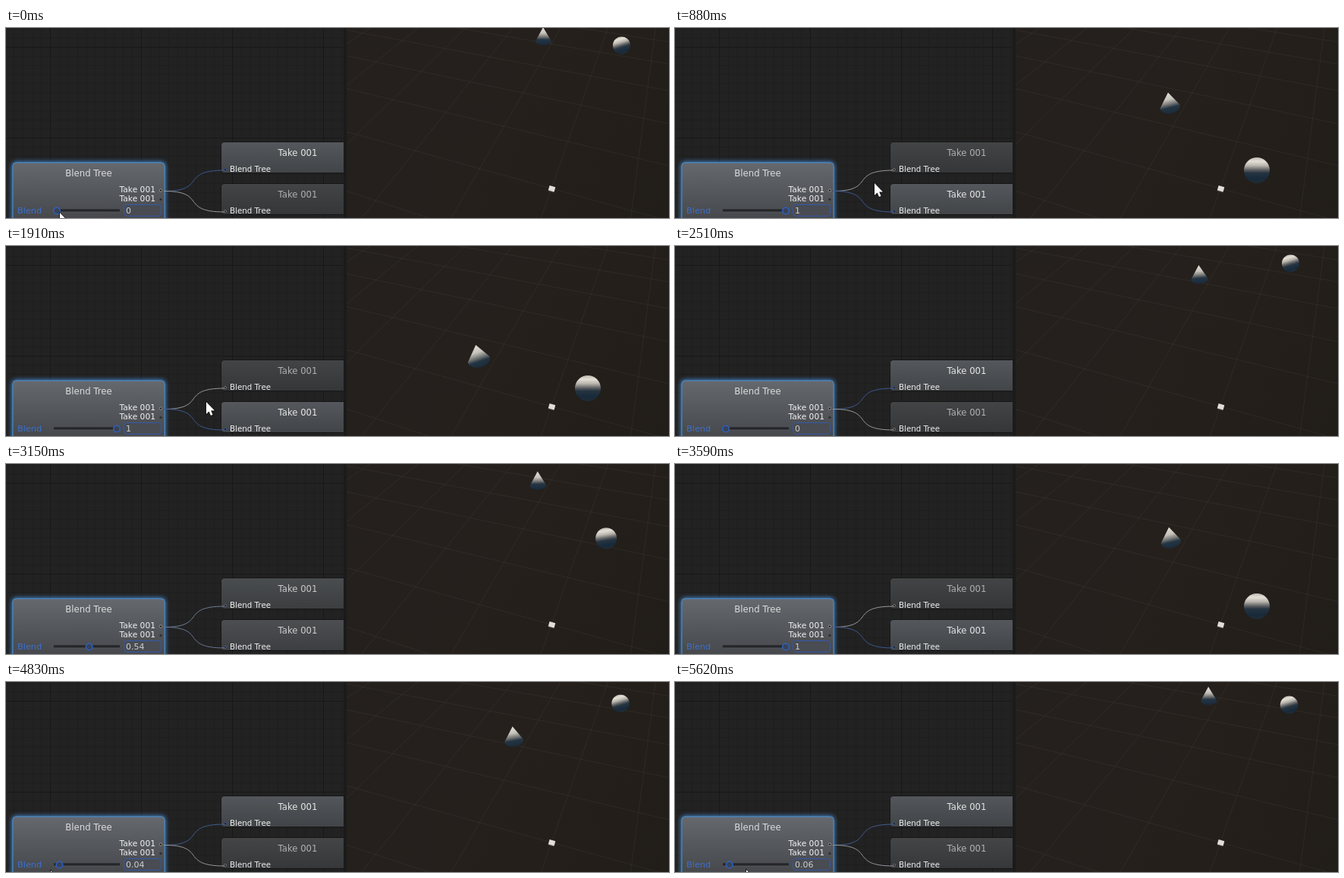
Animation, 874 px wide and 251 px high, one loop 5.66 s. Source, as an HTML page with a canvas:

```html
<!DOCTYPE html>
<html lang="en">
<head>
<meta charset="utf-8">
<title>Blend Tree</title>
<style>
html, body { margin: 0; width: 874px; height: 251px; overflow: hidden; background: #211d1a; }
canvas { display: block; }
</style>
</head>
<body>
<canvas id="stage" width="874" height="251"></canvas>
<script>
const g = document.getElementById('stage').getContext('2d');
const LOOP = 5660, SPLIT = 445, LAG = 370, STEP = 10;
const FONT = '"DejaVu Sans", sans-serif';

// Slider drags: start, end, value reached
const drags = [[110, 770, 1], [1960, 2060, 0], [3050, 3300, 1], [4350, 4900, 0], [5480, 5620, .06]];
// Pointer stops: time, x, y
const stops = [[110, 71, 244], [750, 150, 247], [870, 263, 205], [1960, 264, 206], [2090, 70, 250],
  [2300, 13, 265], [4250, 235, 265], [4350, 200, 250], [4900, 39, 249], [5340, 39, 249], [5620, 94, 248]];

const mix = (a, b, f) => a + (b - a) * f;
const part = (t, a, b) => Math.min(1, Math.max(0, (t - a) / (b - a)));
const rgb = (a, b, f) => `rgb(${a.map((v, i) => Math.round(mix(v, b[i], f))).join()})`;

const blendAt = t => drags.reduce((v, [a, b, to]) => mix(v, to, 1 - (1 - part(t, a, b)) ** 1.5), 0);

// The cone trails the slider exponentially
function trailAt(t) {
  let v = 0;
  for (let s = 0; s < t; s += STEP) v += (blendAt(s) - v) * (1 - Math.exp(-Math.min(STEP, t - s) / LAG));
  return v;
}

function pointerAt(t) {
  let [last, x, y] = stops[0];
  for (const [at, nx, ny] of stops.slice(1)) {
    const f = part(t, last, at);
    x = mix(x, nx, f);
    y = mix(y, ny, f);
    last = at;
  }
  return [x, y];
}

// World distance to distance on the screen
const foreshorten = u => u / (u + 1.4 * (1 - u));

function text(s, x, y, size, color, align = 'left') {
  g.font = `${size}px ${FONT}`;
  g.textAlign = align;
  g.fillStyle = color;
  g.fillText(s, x, y);
}

function line(x0, y0, x1, y1, color) {
  g.strokeStyle = color;
  g.lineWidth = 1;
  g.beginPath();
  g.moveTo(x0, y0);
  g.lineTo(x1, y1);
  g.stroke();
}

function disc(x, y, r, fill, stroke, width = 1) {
  g.beginPath();
  g.arc(x, y, r, 0, 7);
  g.fillStyle = fill;
  g.fill();
  if (!stroke) return;
  g.strokeStyle = stroke;
  g.lineWidth = width;
  g.stroke();
}

function ramp(x0, y0, x1, y1, ...marks) {
  const r = g.createLinearGradient(x0, y0, x1, y1);
  marks.forEach(([at, color]) => r.addColorStop(at, color));
  return r;
}

function box(x, y, w, h, fill, edge) {
  g.beginPath();
  g.roundRect(x, y, w, h, 4);
  g.fillStyle = fill;
  g.fill();
  g.strokeStyle = edge;
  g.lineWidth = 1;
  g.stroke();
}

function graphGrid() {
  g.fillStyle = '#222';
  g.fillRect(0, 0, SPLIT, 251);
  for (let i = -4; i < 33; i++) {
    const color = i % 10 ? '#1e1e1e' : '#181818';
    const x = 58.5 + i * 12, y = 25.5 + i * 12;
    line(x, 0, x, 251, color);
    line(0, y, SPLIT, y, color);
  }
}

function link(y, weight) {
  g.strokeStyle = rgb([155, 155, 155], [62, 90, 148], weight);
  g.lineWidth = 1;
  g.beginPath();
  g.moveTo(208, 215.5);
  g.bezierCurveTo(266, 215.5, 228, y, 288, y);
  g.stroke();
}

function takeNode(y, weight) {
  const fill = ramp(0, y, 0, y + 41,
    [0, rgb([66, 68, 70], [84, 87, 91], weight)], [1, rgb([53, 54, 56], [66, 69, 72], weight)]);
  box(283.5, y - .5, 180, 41, fill, '#161616');
  text('Take 001', 384.5, y + 18, 11.7, rgb([175, 175, 175], [230, 230, 230], weight), 'center');
  text('Blend Tree', 295, y + 39, 10.3, '#eee');
  disc(289, y + 36, 1.5, '#111', rgb([120, 120, 120], [60, 85, 140], weight));
}

function treeNode(blend) {
  const fill = ramp(0, 178, 0, 262, [0, '#65696e'], [.35, '#585b60'], [1, '#424448']);
  g.save();
  g.shadowColor = '#4c9df0';
  g.shadowBlur = 6;
  box(9, 178, 200, 90, fill, '#4683bd');
  g.restore();
  box(9, 178, 200, 90, fill, '#4c88c0');
  text('Blend Tree', 109, 196, 11.7, '#dcdcdc', 'center');
  for (const y of [217, 229]) text('Take 001', 197, y, 10.7, '#f2f2f2', 'right');
  disc(204, 214.5, 1.7, '#111', '#999');
  disc(204, 226.5, 1.5, '#222', '#444');

  text('Blend', 15, 245, 11.3, '#3c70cd');
  g.fillStyle = ramp(0, 239, 0, 244, [0, '#191a1c'], [.6, '#292b2e'], [1, '#606368']);
  g.fillRect(63, 239.5, 87, 4);
  disc(67 + 79 * blend, 241.5, 4.3, '#3a4254', '#2f60bd', 1.6);

  box(155.5, 233.5, 49, 15, '#494c52', '#3358ac');
  text(String(+blend.toFixed(2)), 158, 245, 11, '#cfcfcf');
}

// Ground lines through two vanishing points, counted from the cube
function ground() {
  g.fillStyle = ramp(449, 0, 874, 251, [0, '#24201d'], [.5, '#25201c'], [1, '#211d19']);
  g.fillRect(449, 0, 425, 251);
  const home = [719, 212], far = [893, -283], side = [-1065, -283];
  const point = (i, j) => {
    const a = i * .143, b = j * .056;
    return home.map((v, n) => (v + a * far[n] + b * side[n]) / (1 + a + b));
  };
  const color = 'rgba(230,235,220,.05)';
  for (let i = -2; i < 12; i++) line(...point(i, -7), ...point(i, 16), color);
  for (let j = -7; j < 16; j++) line(...point(-2, j), ...point(14, j), color);
}

function cube() {
  g.save();
  g.translate(719.5, 212.5);
  g.rotate(.28);
  g.fillStyle = '#4c4a48';
  g.fillRect(-4, -3, 8, 7);
  g.fillStyle = '#e2ded6';
  g.fillRect(-4, -3.5, 8, 6.5);
  g.restore();
}

function cone(u) {
  const s = foreshorten(u), x = 708 - 91 * s, y = 135 * s - 1;
  const cx = x + .5 + 3.5 * s, cy = y + 18.5 + .5 * s;
  const rx = 10.5 + 4.5 * s, ry = 5 + 6 * s, turn = -.28 * s;
  const dx = rx * Math.cos(turn), dy = rx * Math.sin(turn);
  g.fillStyle = ramp(x - 2 * s, y, x + 9 * s, y + 24 + 8 * s,
    [0, '#e6e2d8'], [.32, '#c6c3bb'], [.52, '#777877'], [.68, '#243442'], [1, '#172a3b']);
  g.beginPath();
  g.moveTo(x, y);
  g.lineTo(cx + dx, cy + dy);
  g.ellipse(cx, cy, rx, ry, turn, 0, Math.PI);
  g.closePath();
  g.fill();
}

function sphere(u) {
  const s = foreshorten(u);
  const x = 811.5 - 44.5 * s, y = 23 + 165 * s, r = 11.5 + 5.5 * s, tilt = r * .3 * (1 - s);
  disc(x, y, r, ramp(x - tilt, y - r, x + tilt, y + r,
    [0, '#bdb9b1'], [.15, '#e4e0d6'], [.32, '#b9b5ae'], [.48, '#606264'], [.6, '#263440'], [.82, '#172a3b'], [1, '#222c34']));
}

function pointer(x, y) {
  g.beginPath();
  [[0, 0], [0, 16], [3.6, 12.6], [6, 18], [8.6, 16.9], [6.2, 11.6], [11, 11.4]].forEach(([dx, dy]) => g.lineTo(x + dx, y + dy));
  g.closePath();
  g.strokeStyle = '#111';
  g.lineWidth = 1.5;
  g.stroke();
  g.fillStyle = '#fff';
  g.fill();
}

function draw(t) {
  const blend = blendAt(t);
  ground();
  cone(trailAt(t));
  sphere(blend);
  cube();

  g.save();
  g.beginPath();
  g.rect(0, 0, SPLIT, 251);
  g.clip();
  graphGrid();
  takeNode(151, 1 - blend);
  takeNode(206, blend);
  treeNode(blend);
  link(188, 1 - blend);
  link(243, blend);
  g.restore();
  g.fillStyle = '#1b1b1b';
  g.fillRect(SPLIT, 0, 4, 251);
  pointer(...pointerAt(t));
}

function tick() {
  draw(performance.now() % LOOP);
  requestAnimationFrame(tick);
}
tick();
</script>
</body>
</html>
```
